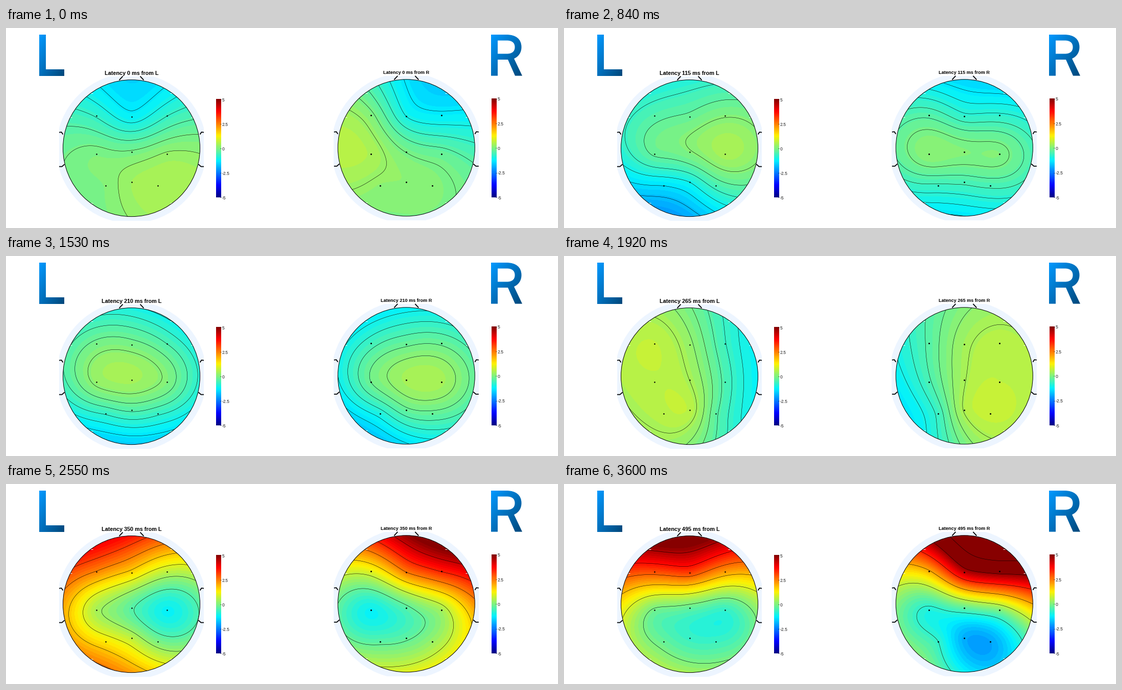
Animation, 1080 px wide and 392 px high, one loop 3630 ms. Source, as a matplotlib script:

```python
import numpy as np
import matplotlib.pyplot as plt
from matplotlib.animation import FuncAnimation
from matplotlib.colors import ListedColormap
from matplotlib.patches import Circle, PathPatch, Rectangle
from matplotlib.path import Path

W, H, DPI = 1080, 392, 100
PX = 72 / DPI
R = 134                       # head radius in pixels
plt.rcParams["font.family"] = "Liberation Sans"

# Sensor grid: columns left to right, rows front to back
COL, ROW = np.tile([-1, 0, 1], 3), np.repeat([-1, 0, 1], 3)
SENSORS = np.column_stack([
    COL * (60 - 9 * ROW + 9 * (1 - ROW ** 2)),
    7.8 + 64.4 * ROW + 4 * COL ** 2 - 5.7 * COL ** 2 * (ROW == -1)
    + 3 * COL ** 2 * (ROW == 1) - 5.4 * (ROW != 0)])

# Time courses in microvolts: what both heads share, then each one's slopes
LATENCY = np.array([0, 65, 160, 265, 350, 405, 495])
MEAN = [-.2, -.23, -.47, .17, .6, .62, .62]
ARCH = [-.35, -.35, -.85, 0, 1.45, 1.4, 1.5]      # outer rows over the middle
BOW = [.18, .18, -.1, -.34, 0, -.33, -.15]        # sides over the midline
RIGHT_SLOPE = {"L": [.11, .25, .28, -.54, -.78, -.44, -.31],
               "R": [-.34, -.11, 0, .57, .76, 1.06, .48]}
BACK_SLOPE = {"L": [.57, -.07, -.5, .1, -.43, -1.19, -1.64],
              "R": [.43, .37, -.22, 0, -1.23, -2.7, -2.7]}
TWIST = {"L": 0, "R": .45}    # how far the back slope leans to one side


def smooth(points, t):
    """Cubic curve through one value per key latency."""
    p, m = np.array(points), np.gradient(points, LATENCY)
    i = min(np.searchsorted(LATENCY, t, side="right"), len(p) - 1) - 1
    h = LATENCY[i + 1] - LATENCY[i]
    s = (t - LATENCY[i]) / h
    a = s * s * (3 - 2 * s)
    return (p[i] * (1 - a) + p[i + 1] * a
            + h * s * (1 - s) * (m[i] * (1 - s) - m[i + 1] * s))


def readings(name, t):
    right, back = smooth(RIGHT_SLOPE[name], t), smooth(BACK_SLOPE[name], t)
    sides = COL ** 2 - 2 / 3
    return (smooth(MEAN, t) + right * COL + back * ROW
            + (.1 + TWIST[name] * back) * COL * ROW
            + smooth(BOW, t) * sides
            + smooth(ARCH, t) * (ROW ** 2 - 2 / 3)
            - (.1 + .3 * back) * sides * ROW)


def green(points):
    """Biharmonic spline basis of the sensors at the given points."""
    d = np.linalg.norm(points[:, None] - SENSORS, axis=2) / (2 * R)
    return d ** 2 * (np.log(np.maximum(d, 1e-9)) - 1)


def jet(n=64):
    x = 4 * (np.arange(n) + .5) / n
    rgb = np.stack([1.5 - abs(x - c) for c in (3, 2, 1)], axis=1)
    return ListedColormap(np.clip(rgb, 0, 1) * (1, .95, 1))


JET = jet()
AXIS = np.arange(-R, R + 1)
GX, GY = np.meshgrid(AXIS, AXIS)
INSIDE = np.hypot(GX, GY) <= R
SPREAD = (green(np.column_stack([GX.ravel(), GY.ravel()]))
          @ np.linalg.inv(green(SENSORS)))

fig = plt.figure(figsize=(W / DPI, H / DPI), dpi=DPI, facecolor="white")
ax = fig.add_axes([0, 0, 1, 1])
ax.axis("off")


def line(xs, ys, width=1.8, color="black", z=4):
    ax.plot(xs, ys, color=color, lw=width * PX, zorder=z,
            solid_capstyle="butt")


def picture(data, extent, **kw):
    return ax.imshow(data, extent=extent, aspect="auto", zorder=1, **kw)


class Head:
    def __init__(self, name, cx, cy, title_y, title_px, dot):
        self.name, self.cx, self.cy = name, cx, cy
        self.lines = None

        box = Rectangle((cx - 142, cy - 141), 283.5, 283, fc="none",
                        ec="none")
        halo = Circle((cx, cy), 147, fc=(.93, .96, 1), ec="none", zorder=0)
        self.disc = Circle((cx, cy), R, fc="none", ec="black", lw=PX,
                           zorder=4)
        for patch in (box, halo, self.disc):
            ax.add_patch(patch)
        halo.set_clip_path(box)

        e = R + .5
        self.image = picture(np.zeros(GX.shape),
                             (cx - e, cx + e, cy + e, cy - e), cmap=JET,
                             vmin=-5, vmax=5, interpolation="nearest")
        self.image.set_clip_path(self.disc)

        for side in (-1, 1):
            # nose, ear, and small gaps in the rim
            line(cx + side * np.array([24, 17]), [cy - 133.5, cy - 141])
            for shape in ([(134, -27), (137, -31.5), (141.5, -31)],
                          [(131, 31.5), (136, 36), (141.5, 36)]):
                xs, ys = np.array(shape).T
                line(cx + side * xs, cy + ys)
            for ang in np.radians([27, 54, -54]):
                x, y = side * np.cos(ang) * 132.5, -np.sin(ang) * 132.5
                line([cx + x - 2, cx + x + 2], [cy + y] * 2, 1, "white", 3)

        ax.plot(*(SENSORS + (cx, cy)).T, "o", color="black", mew=0,
                ms=dot * PX, zorder=5)
        self.title = ax.text(cx, title_y, "", ha="center", va="baseline",
                             weight="bold", size=title_px * PX, zorder=6)

    def show(self, t):
        z = (SPREAD @ readings(self.name, t)).reshape(GX.shape)
        self.image.set_data(z)
        levels = np.linspace(z[INSIDE].min(), z[INSIDE].max(), 8)[1:-1]
        if self.lines is not None:
            self.lines.remove()
        s = slice(None, None, 2)
        self.lines = ax.contour(AXIS[s] + self.cx, AXIS[s] + self.cy,
                                z[s, s], levels, colors="black",
                                linestyles="solid", linewidths=.55 * PX,
                                zorder=3)
        self.lines.set_clip_path(self.disc)
        self.title.set_text(f"Latency {t} ms from {self.name}")


def colorbar(x, top, bottom):
    picture(np.arange(64)[:, None], (x, x + 10, bottom, top), cmap=JET,
            origin="lower", interpolation="nearest")
    for y, value in zip(np.linspace(top + .5, bottom, 5),
                        np.linspace(5, -5, 5)):
        line([x + 8, x + 10], [y, y], .6, z=3)
        ax.text(x + 12, y + .3, f"{value:g}".replace("\u2212", "-"),
                size=8.7 * PX, color="#222222", va="center_baseline")


def letter(x0, x1, *parts):
    """A letter 81 px tall, filled with a diagonal blue gradient."""
    verts, codes = [], []
    for code, *points in parts:
        verts += points
        codes += [code] * len(points)
    shape = PathPatch(Path(verts, codes), fc="none", ec="none")
    ax.add_patch(shape)
    u = np.linspace(0, 1, 90)
    mix = ((u[None, :] + u[:, None]) / 2)[..., None]
    rgb = np.array([0, .6, 1]) * (1 - mix) + np.array([0, .28, .48]) * mix
    picture(rgb, (x0, x1, 94, 13)).set_clip_path(shape)


M, L, C = Path.MOVETO, Path.LINETO, Path.CURVE4
letter(65, 114,
       (M, (65, 13)),
       (L, (78, 13), (78, 81), (114, 81), (114, 93.6), (65, 93.6), (65, 13)))
letter(949, 1010,
       (M, (949, 13)), (L, (979, 13)),
       (C, (998, 13), (1008.5, 22), (1008.5, 37.5)),
       (C, (1008.5, 48), (1003, 56), (994, 60)),
       (L, (1010, 93.6), (996, 93.6), (982, 62), (962, 62), (962, 93.6),
        (949, 93.6), (949, 13)),
       (M, (962, 24.5)), (L, (962, 50.5), (980, 50.5)),
       (C, (990, 50.5), (995.5, 46), (995.5, 37.5)),
       (C, (995.5, 29), (990, 24.5), (980, 24.5)), (L, (962, 24.5)))

heads = [Head("L", 245.5, 235.6, 91.6, 10.9, 2.6),
         Head("R", 783.3, 234.8, 90.4, 9.2, 3.0)]
colorbar(411, 139.5, 332)
colorbar(949.5, 138, 332)


def update(frame):
    # 36 ms per map, shown on a 30 ms clock
    t = 5 * min(99, frame * 5 // 6)
    for head in heads:
        head.show(t)
    ax.set_xlim(0, W)
    ax.set_ylim(H, 0)
    return []


anim = FuncAnimation(fig, update, frames=121, interval=30, repeat=True,
                     repeat_delay=0, init_func=lambda: [], blit=False)
plt.show()
```
